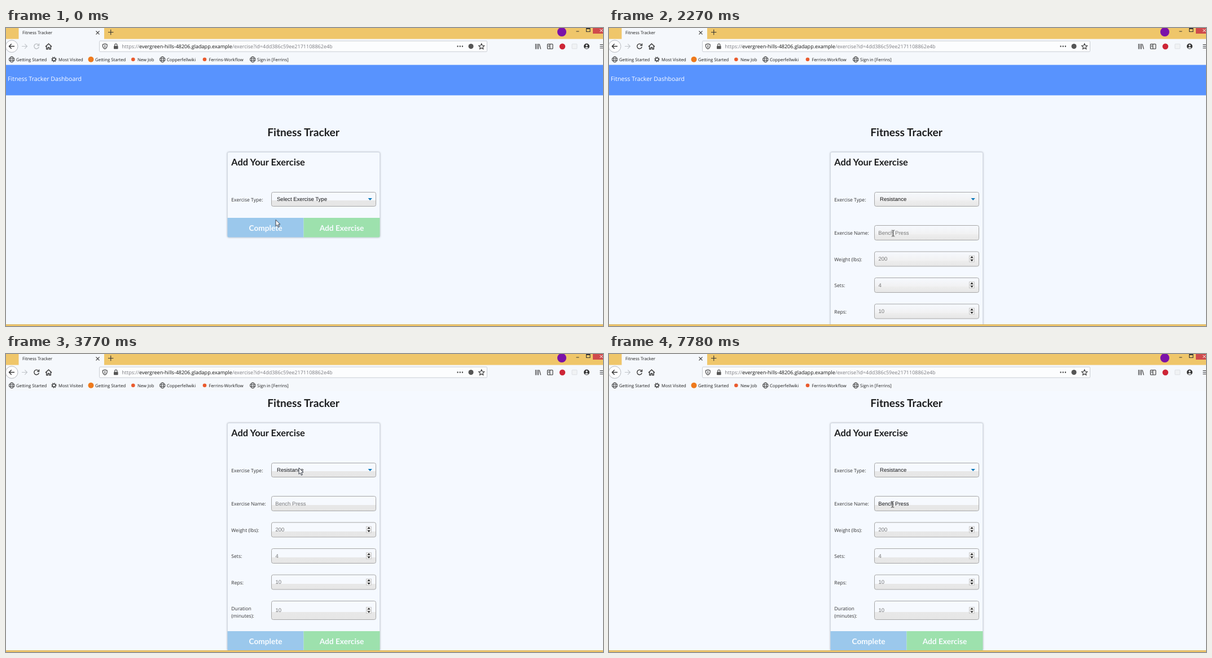
An HTML page for the animation above (8 s loop, 1058 by 529 pixels).

```html
<!DOCTYPE html>
<html lang="en">
<head>
<meta charset="utf-8">
<title>Fitness Tracker</title>
<style>
html, body { margin: 0; width: 100%; height: 100%; overflow: hidden; background: #f3f8ff; }
svg { display: block; }
text { white-space: pre; text-rendering: geometricPrecision; }
.ui { font-family: "Open Sans", "Noto Sans", sans-serif; font-size: 7.7px; fill: #1c1c1c; }
.url { font-size: 9.03px; fill: #7b7b80; }
.host { fill: #111; }
.brand { font-size: 10.65px; fill: #fff; }
.label { font-size: 8.65px; fill: #333; }
.lato { font-family: Lato, "Open Sans", sans-serif; font-weight: 700; fill: #1b1c1d; }
.form { font-family: "Liberation Sans", Arial, sans-serif; font-size: 9.55px; fill: #111; }
.hint { fill: #777; }
.line { fill: none; stroke: #333; stroke-width: 1.1; }
.bold { stroke-width: 1.4; }

/* One loop is 8 s, so 1% is 80 ms. Every change is hard. */
.anim { animation: 8s step-end infinite; }
#paper { animation-name: paper; }
#scroll { animation-name: scroll; }
#card { animation-name: card; }
#foot { animation-name: foot; }
#rows, #picked { animation-name: chosen; }
#unpicked { animation-name: unchosen; }
#popup { animation-name: popup; }
#hover { animation-name: hover; }
#hoverText { animation-name: hoverText; }
#upper { animation-name: upper; }
#lower { animation-name: lower; }
#reload { animation-name: reload; }
#mouse { animation-name: mouse; }
#arrow { animation-name: arrow; }
#beam { animation-name: beam; }
#ring { animation-name: ring; }
#nameHint { animation-name: nameHint; }
#reveal, #caret { animation-name: type; }
#blink { animation-name: blink; }
#caret2 { animation-name: blink2; }

@keyframes paper { 0% { fill: #f3f8ff } 33.375% { fill: #f5f9ff } }
@keyframes scroll {
  0% { transform: translateY(0) }
  33.375% { transform: translateY(-48px) }
  34.875% { transform: translateY(-98px) }
}
@keyframes card { 0% { height: 151px } 21.5% { height: 404px } }
@keyframes foot { 0% { transform: translateY(0) } 21.5% { transform: translateY(253px) } }
@keyframes chosen { 0% { opacity: 0 } 21.5% { opacity: 1 } }
@keyframes unchosen { 0% { opacity: 1 } 21.5% { opacity: 0 } }
@keyframes popup { 0% { opacity: 0 } 6.75% { opacity: 1 } 21.5% { opacity: 0 } }
@keyframes hover { 0% { opacity: 0 } 14.75% { opacity: 1 } }
@keyframes hoverText { 0% { fill: #111 } 14.75% { fill: #fff } }
@keyframes upper { 0% { stop-color: #f6f9fe } 4.875% { stop-color: #f1f1f2 } 33.375% { stop-color: #f6f9fe } }
@keyframes lower { 0% { stop-color: #e7e7e7 } 4.875% { stop-color: #eee } 33.375% { stop-color: #e8e8e8 } }
@keyframes reload { 0% { stroke: #b9bcc0 } 1.5% { stroke: #333 } }
@keyframes mouse {
  0% { transform: translate(478px, 343.5px) }
  1.5% { transform: translate(489px, 352px) }
  3% { transform: translate(488px, 333px) }
  4.875% { transform: translate(500px, 315px) }
  6.75% { transform: translate(508px, 313px) }
  11.375% { transform: translate(508px, 318px) }
  13.25% { transform: translate(508px, 326px) }
  14.75% { transform: translate(508px, 337px) }
  16.25% { transform: translate(507.5px, 340px) }
  18.125% { transform: translate(508px, 340px) }
  26.5% { transform: translate(503.5px, 359.5px) }
  28.375% { transform: translate(503.5px, 364.5px) }
  38.375% { transform: translate(515.5px, 263.5px) }
  40.25% { transform: translate(517px, 237px) }
  47.125% { transform: translate(519px, 205px) }
  48.625% { transform: translate(515px, 225px) }
  50.125% { transform: translate(506px, 247px) }
  51.625% { transform: translate(502.5px, 267px) }
}
@keyframes arrow { 0% { opacity: 1 } 26.5% { opacity: 0 } 40.25% { opacity: 1 } 51.625% { opacity: 0 } }
@keyframes beam { 0% { opacity: 0 } 26.5% { opacity: 1 } 40.25% { opacity: 0 } 51.625% { opacity: 1 } }
@keyframes ring {
  0% { opacity: 0 } 6.75% { opacity: 1 } 8.25% { opacity: 0 }
  20% { opacity: 1 } 21.5% { opacity: 0 }
  51.625% { opacity: 1 } 53.125% { opacity: 0 }
}
@keyframes nameHint { 0% { opacity: 1 } 63.5% { opacity: 0 } }
@keyframes type {
  0% { transform: translateX(0) }
  63.5% { transform: translateX(6.4px) }
  65% { transform: translateX(11.7px) }
  66.5% { transform: translateX(17px) }
  70% { transform: translateX(27.1px) }
  71.875% { transform: translateX(29.7px) }
  77.25% { transform: translateX(36.1px) }
  78.75% { transform: translateX(39.3px) }
  82.25% { transform: translateX(44.6px) }
  83.75% { transform: translateX(49.4px) }
  87.125% { transform: translateX(54.3px) }
}
@keyframes blink { 0% { opacity: 0 } 53.125% { opacity: 1 } 58.5% { opacity: 0 } 63.5% { opacity: 1 } 91% { opacity: 0 } }
@keyframes blink2 { 0% { opacity: 0 } 91% { opacity: 1 } 97.25% { opacity: 0 } }
</style>
</head>
<body>
<svg width="1058" height="529" viewBox="0 0 1058 529">
  <defs>
    <linearGradient id="shade" x2="0" y2="1">
      <stop stop-color="#f6f9fe"/>
      <stop id="upper" class="anim" offset=".6"/>
      <stop id="lower" class="anim" offset=".6"/>
      <stop offset="1" stop-color="#e6e6e6"/>
    </linearGradient>
    <clipPath id="typed"><rect id="reveal" class="anim" x="417" y="350" width="60.4" height="28"/></clipPath>
    <rect id="field" x="470.5" width="185" height="26" rx="3" fill="url(#shade)" stroke="#a6a6a6"/>
    <g id="spin">
      <rect x="638.5" y="-5.5" width="9" height="11" fill="#f1f1f1" stroke="#c4c4c4" stroke-width=".8"/>
      <path d="M638.5 0h9" stroke="#c4c4c4" stroke-width=".8"/>
      <path d="M640.3-1.4h5.4L643-4.6zM640.3 1.4h5.4L643 4.6z" fill="#222"/>
    </g>
    <g id="globe" fill="none" stroke="#333" stroke-width=".9">
      <circle r="4.8"/>
      <ellipse rx="2.1" ry="4.8"/>
      <path d="M-4.5-1.6h9M-4.5 1.6h9"/>
    </g>
  </defs>

  <rect id="paper" class="anim" y="65" width="1058" height="464"/>

  <g id="scroll" class="anim">
    <rect y="65" width="1058" height="54.5" fill="#5893fe"/>
    <text class="ui brand" x="3" y="93.5">Fitness Tracker Dashboard</text>
    <text class="lato" x="527" y="192.3" font-size="19.2" text-anchor="middle">Fitness Tracker</text>

    <rect id="card" class="anim" x="392.5" y="220.5" width="270" height="151" rx="2.5" fill="#f5f9ff" stroke="#d3dae4" style="filter:drop-shadow(0 .7px 1.8px #0004)"/>
    <text class="lato" x="399.3" y="243.8" font-size="16.4">Add Your Exercise</text>

    <text class="ui label" x="399.3" y="308">Exercise Type:</text>
    <rect x="470.5" y="291.5" width="185" height="25" rx="3" fill="url(#shade)" stroke="#a6a6a6"/>
    <g class="form">
      <text id="unpicked" class="anim" x="480" y="307.2">Select Exercise Type</text>
      <text id="picked" class="anim" x="480" y="307.2">Resistance</text>
    </g>
    <path d="M641.5 302h7.4l-3.7 4z" fill="#0b78ba"/>

    <g id="rows" class="anim">
      <g class="ui">
        <text class="label" x="399.3" y="367.3">Exercise Name:</text>
        <text class="label" x="399.3" y="413.8">Weight (lbs):</text>
        <text class="label" x="399.3" y="460.3">Sets:</text>
        <text class="label" x="399.3" y="506.8">Reps:</text>
        <text class="label" x="399.3" y="553">Duration</text>
        <text class="label" x="399.3" y="566.3">(minutes):</text>
      </g>
      <use href="#field" y="350.5"/>
      <use href="#field" y="397"/>
      <use href="#field" y="443.5"/>
      <use href="#field" y="490"/>
      <rect x="470.5" y="536.5" width="185" height="33" rx="3" fill="url(#shade)" stroke="#a6a6a6"/>
      <use href="#spin" y="409.7"/>
      <use href="#spin" y="456.2"/>
      <use href="#spin" y="502.7"/>
      <use href="#spin" y="553"/>
      <g class="form">
        <text id="nameHint" class="anim hint" x="477.3" y="366.5">Bench Press</text>
        <text x="477.3" y="366.5" clip-path="url(#typed)">Bench Press</text>
        <text class="hint" x="477.5" y="413">200</text>
        <text class="hint" x="477.5" y="459.5">4</text>
        <text class="hint" x="477.5" y="506">10</text>
        <text class="hint" x="477.5" y="556.4">10</text>
      </g>
      <g id="blink" class="anim"><rect id="caret" class="anim" x="477.8" y="357" width=".9" height="11"/></g>
      <rect id="caret2" class="anim" x="477.8" y="404" width=".9" height="11"/>
    </g>

    <g id="foot" class="anim">
      <path d="M392.5 337H527.5v34.500H395q-2.5 0-2.5-2.5z" fill="#9bc8ec"/>
      <path d="M527.5 337h135v32q0 2.5-2.5 2.5h-132.5z" fill="#9de1ad"/>
      <g class="lato" font-size="13.7" text-anchor="middle" style="fill:#f7fbff">
        <text x="460" y="359.7">Complete</text>
        <text x="595" y="359.7">Add Exercise</text>
      </g>
    </g>

    <g id="popup" class="anim form">
      <rect x="470.5" y="316.5" width="184" height="51.5" fill="#fff" stroke="#8d939b"/>
      <rect id="hover" class="anim" x="471" y="334" width="183" height="17" fill="#39f"/>
      <text class="hint" x="474.8" y="328.8">Select Exercise Type</text>
      <text id="hoverText" class="anim" x="474.8" y="345.6">Resistance</text>
      <text x="474.8" y="362.6">Cardio</text>
    </g>
  </g>

  <!-- Window frame and tab -->
  <rect width="1058" height="20" fill="#efc66a"/>
  <rect y="19.5" width="1058" height="46" fill="#f5f8fc"/>
  <rect x="22.5" width="151.5" height="20" fill="#f5f8fc"/>
  <text class="ui" x="29" y="11.3">Fitness Tracker</text>
  <path class="line" d="M159.5 5.3l6 6m0-6l-6 6M181 7.5h9.4M185.7 2.8v9.4"/>
  <circle cx="985" cy="7" r="8" fill="#7b12a8"/>
  <path class="line" d="M1010.5 6h5M1028.5.5h6.5v6h-6.5zM1028.5 1.5h6.5"/>
  <rect x="1040" width="18" height="10" fill="#cf4a4c"/>
  <path d="M1052.5 2l5 5m0-5l-5 5" stroke="#fff"/>

  <!-- Navigation bar -->
  <circle cx="10.2" cy="32.5" r="10.8" fill="#fdfdfe" stroke="#b4b8be"/>
  <path class="line bold" d="M15 32.5H5.5m4.2-4.2l-4.2 4.2 4.2 4.2"/>
  <path class="line" d="M28 32.5h9.5m-4.2-4.2l4.2 4.2-4.2 4.2" style="stroke:#bfc3c8"/>
  <path id="reload" class="anim" fill="none" stroke-width="1.3" d="M57.5 29.8a4.3 4.3 0 1 0 .8 3.7M58.6 27.6v3.4h-3.4"/>
  <path class="line bold" d="M70 33l5.5-5 5.5 5M71.7 32v5.5h2.6v-3h2.4v3h2.6V32"/>
  <rect x="165.5" y="23" width="687" height="19" rx="1.5" fill="#fcfdfe" stroke="#c9cdd3"/>
  <path class="line" d="M175.3 28l3.8 1.2v2.6q0 3.5-3.8 5.4-3.8-1.9-3.8-5.4v-2.6zM175.3 30v5"/>
  <rect x="191" y="31.8" width="7.6" height="5.5" rx=".8" fill="#555"/>
  <path d="M192.7 32v-1.8a2.1 2.1 0 0 1 4.2 0V32" fill="none" stroke="#555" stroke-width="1.2"/>
  <text class="ui url" x="205.3" y="36">https://<tspan class="host">evergreen-hills-48206.gladapp.example</tspan>/exercise?id=4dd386c59ee2171108862e4b</text>
  <path d="M800.5 32.5h0M804.7 32.5h0M808.9 32.5h0" stroke="#444" stroke-width="2.4" stroke-linecap="round"/>
  <circle cx="824" cy="32.5" r="4.5" fill="#555"/>
  <path class="line" d="M842.7 27.8l1.5 3.2 3.5.4-2.6 2.4.7 3.5-3.1-1.8-3.1 1.8.7-3.5-2.6-2.4 3.5-.4z"/>
  <path class="line" d="M938.5 28v9.5M941 28v9.5M943.5 28v9.5M945.2 28.3l2.4 9"/>
  <rect class="line" x="959.5" y="28.5" width="9.5" height="8.5" rx="1"/>
  <path class="line" d="M964 28.5v8.5M961 31h2M961 33h2"/>
  <circle cx="986" cy="32.7" r="5.2" fill="#cd2536"/>
  <rect x="1003" y="28.3" width="9" height="8.5" rx="1" fill="#f0f2f4" stroke="#dcdfe3"/>
  <circle cx="1029" cy="32.5" r="5" fill="#333"/>
  <circle cx="1029" cy="31" r="1.7" fill="#f5f8fc"/>
  <path d="M1025.9 35.3q3.1-3 6.2 0-3.1 2.4-6.2 0z" fill="#f5f8fc"/>
  <path class="line" d="M1052.5 29.5h6M1052.5 32.5h6M1052.5 35.5h6"/>

  <!-- Bookmarks -->
  <use href="#globe" x="10.2" y="55.8"/>
  <use href="#globe" x="277.3" y="55.8"/>
  <use href="#globe" x="437.3" y="55.8"/>
  <g fill="none" stroke="#333">
    <circle cx="85" cy="55.8" r="2.7" stroke-width="1.3"/>
    <circle cx="85" cy="55.8" r="4.1" stroke-width="1.5" stroke-dasharray="1.3 1.92"/>
  </g>
  <circle cx="150.5" cy="55.8" r="5" fill="#ee7a1c"/>
  <circle cx="225.3" cy="55.8" r="3.3" fill="#ea5a2d"/>
  <circle cx="352" cy="55.8" r="3.3" fill="#ea5a2d"/>
  <g class="ui">
    <text x="18" y="58.7">Getting Started</text>
    <text x="93" y="58.7">Most Visited</text>
    <text x="158" y="58.7">Getting Started</text>
    <text x="233" y="58.7">New Job</text>
    <text x="285" y="58.7">Copperfellwiki</text>
    <text x="359.5" y="58.7">Ferrins-Workflow</text>
    <text x="445" y="58.7">Sign in [Ferrins]</text>
  </g>

  <rect y="526" width="1058" height="3" fill="#efc66a"/>
  <rect y="526" width="1058" height="1" fill="#d9b15c"/>

  <g id="mouse" class="anim">
    <path id="arrow" class="anim" d="M0-3v11.3l2.6-2.3 1.8 4.2 1.9-.8-1.8-4.1 3.4-.3z" fill="#fff" stroke="#1d2433" stroke-width=".9"/>
    <path id="beam" class="anim" d="M-2.5-5.3q2.5 0 2.5 1.3 0-1.3 2.5-1.3M0-4v8M-2.5 5.3q2.5 0 2.5-1.3 0 1.3 2.5 1.3" fill="none" stroke="#222"/>
    <circle id="ring" class="anim" cx=".5" r="6" fill="none" stroke="#1d2433"/>
  </g>
</svg>
</body>
</html>
```
